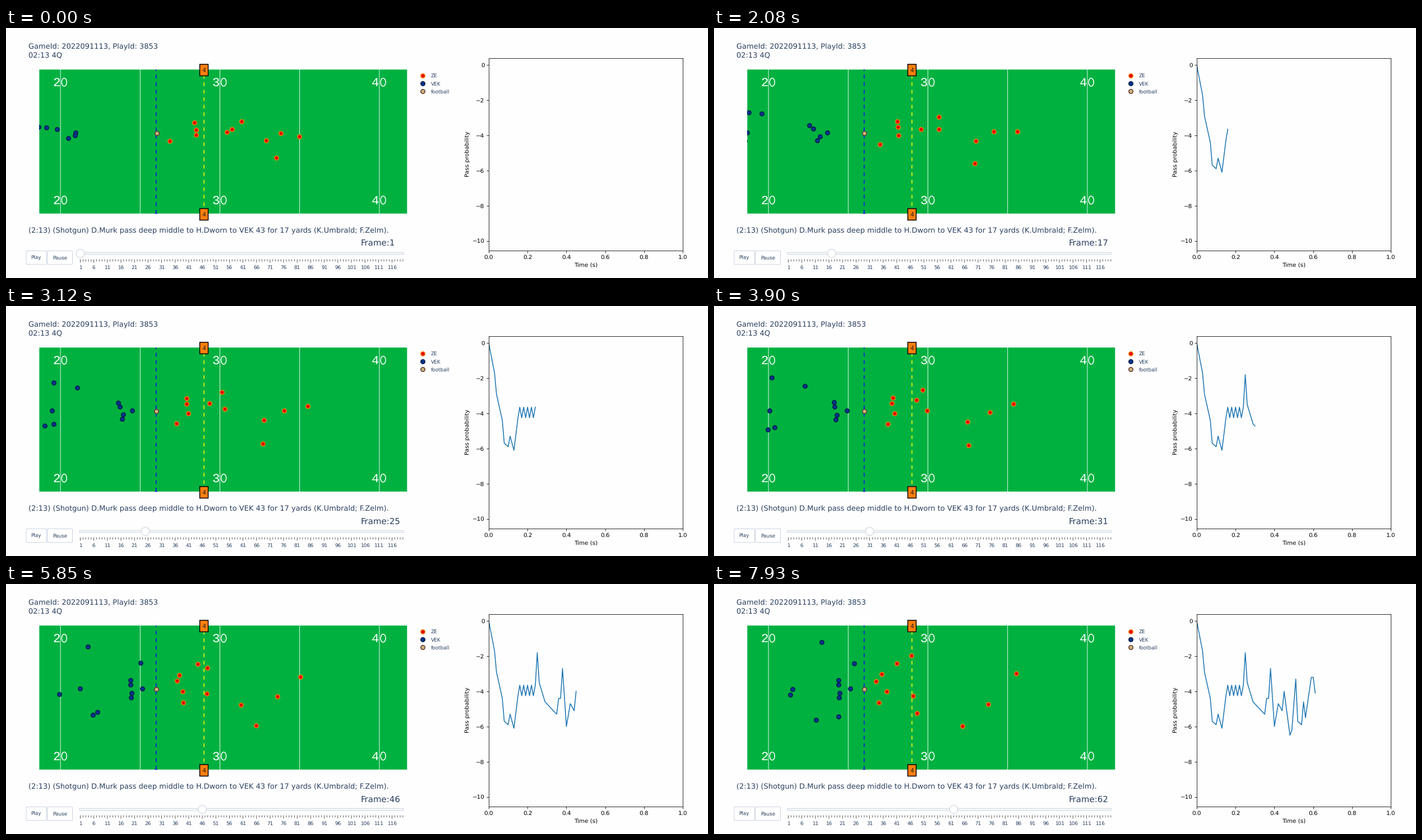
Write a matplotlib script that moves like this. It is 1252 by 447 pixels and loops after 8000 ms.

```python
import numpy as np
import matplotlib.pyplot as plt
from matplotlib.animation import FuncAnimation
from matplotlib.patches import Circle, Ellipse, FancyBboxPatch, Rectangle

W, H, DPI = 1252, 447, 64
STEPS, LOOP = 62, 8000
PT = 72 / DPI          # points per pixel
S = 0.745              # scale of the whole page
PAPER, INK, EDGE = "#fefefe", "#2a3f5f", "#bec8d9"
RED, BLUE, BALL = ("#e00808", "#ff7900"), ("#003594", "#041e42"), ("#cbb67c", "#663831")
MONO = "Liberation Mono"

plt.rcParams.update({"font.family": "DejaVu Sans", "lines.scale_dashes": False,
                     "text.hinting": "no_hinting"})
fig = plt.figure(figsize=(W / DPI, H / DPI), dpi=DPI, facecolor=PAPER)
page = fig.add_axes([0, 0, 1, 1])
page.set(xlim=(0, W), ylim=(H, 0))
page.axis("off")


def write(x, y, text, size, color=INK, ha="left", font="DejaVu Sans", z=5):
    return page.text(x, y, text, fontsize=size * PT, color=color, ha=ha,
                     va="baseline", family=font, zorder=z)


def box(x0, y0, x1, y1, fill, edge="none", lw=0.0, z=1):
    return page.add_patch(Rectangle((x0, y0), x1 - x0, y1 - y0, facecolor=fill,
                                    edgecolor=edge, linewidth=lw * PT, zorder=z))


def upright(x, y0, y1, color, lw, z=2, **style):
    page.plot([x, x], [y0, y1], color=color, lw=lw * PT, zorder=z, **style)


def pill(x0, y0, x1, y1, r, fill):
    page.add_patch(FancyBboxPatch((x0 + r, y0 + r), x1 - x0 - 2 * r, y1 - y0 - 2 * r,
                                  boxstyle=f"round,pad={r}", facecolor=fill,
                                  edgecolor=EDGE, linewidth=0.8 * PT, zorder=3))


def dots(points, colors):
    x, y = np.transpose(points)
    return page.scatter(x, y, s=(10 * S * PT) ** 2, facecolor=colors[0],
                        edgecolor=colors[1], linewidth=1.5 * PT, zorder=6)


def yard(n):
    return 97.1 + 28.44 * (n - 20)


# Field
TOP, BOTTOM = 74.3, 331.8
field = box(59.4, TOP, 715.3, BOTTOM, "#00b140")
for n in range(20, 41, 5):
    upright(yard(n), TOP, BOTTOM, "white", 0.9)
    if n % 10 == 0:
        for base in (104.2, 315):
            write(yard(n), base, f"{n // 10} ", 30 * S, "white", "center", MONO)
            page.add_patch(Ellipse((yard(n) + 6.7, base - 7.3), 9, 14.4, fill=False,
                                   edgecolor="white", lw=1.5 * PT, zorder=5))
for n, color in ((26, "blue"), (29, "yellow")):
    upright(yard(n), BOTTOM, TOP, color, 1.5, 4, ls=(0, (9 * S * PT, 9 * S * PT)))
box(yard(26) - 2.2, 331, yard(26) + 2.2, 332.2, "blue", z=4)
for y in (75.2, 333.2):
    box(yard(29) - 7.5, y - 10.3, yard(29) + 7.5, y + 10.3, "#ff7f0e", "black", 1.5, 7)
    write(yard(29), y + 3.8, "4", 11.5, "#1b1b1b", "center", MONO, 8)

# Texts and legend
write(40, 37.5, "GameId: 2022091113, PlayId: 3853", 13.05)
write(40, 53.5, "02:13 4Q", 13.05)
write(40, 366.5, "(2:13) (Shotgun) D.Murk pass deep middle to H.Dworn to VEK 43 "
      "for 17 yards (K.Umbrald; F.Zelm).", 13)
counter = write(632.3, 389.7, "", 15)
for i, (name, colors) in enumerate((("ZE", RED), ("VEK", BLUE), ("football", BALL))):
    dots([(742.9, 85 + 14.1 * i)], colors)
    write(757.8, 88.5 + 14.1 * i, name, 12 * S)

# Buttons and slider
pill(36, 398.3, 72.3, 422.8, 1.5, "white")
pill(74, 398.3, 118.6, 422.8, 1.5, "white")
write(53.7, 413.5, "Play", 12 * S, ha="center")
write(95.8, 413.5, "Pause", 12 * S, ha="center")
pill(131, 401.2, 709.3, 404.9, 1.5, "#f8fafc")
SLIDE0, SLIDE = 132.5, 4.835
for k in range(120):
    x, major = SLIDE0 + SLIDE * k, k % 5 == 0
    upright(x, 414, 419.2 if major else 417, "#333333", 0.8, 3)
    if major:
        write(x, 431, str(k + 1), 12 * S, ha="center")
grip = page.add_patch(Circle((SLIDE0, 403), 7.4, facecolor="white", edgecolor=EDGE,
                             linewidth=0.8 * PT, zorder=6))
for art in [*page.lines, *page.patches]:
    art.set_snap(False)

# Probability chart
K = S * 100 / DPI
chart = fig.add_axes([860.9 / W, (H - 397.8) / H, 346.4 / W, 344.2 / H], facecolor=PAPER)
chart.set(xlim=(0, 1), ylim=(-10.55, 0.4))
chart.set_xlabel("Time (s)", fontsize=10 * K, labelpad=4 * K)
chart.set_ylabel("Pass probability", fontsize=10 * K, labelpad=4 * K)
chart.set_xticks(np.arange(6) / 5)
chart.set_yticks(range(-10, 1, 2))
chart.tick_params(length=3.5 * K, width=0.8 * K, pad=3.5 * K, labelsize=10 * K)
for spine in chart.spines.values():
    spine.set_linewidth(0.8 * K)
curve, = chart.plot([], [], color="#1f77b4", lw=1.5 * K)

# Turning points of the curve; a steady zigzag fills steps 17 to 24
TURNS = [(0, 0), (3, -1.7), (4, -2.9), (7, -4.4), (8, -5.7), (10, -5.9), (11, -5.3),
         (13, -6.1), (15, -4.3), (25, -1.8), (26, -3.5), (29, -4.6), (35, -5.3),
         (36, -4.4), (37, -4.4), (38, -2.7), (40, -6), (42, -4.7), (44, -5.1),
         (45, -4), (48, -6.5), (49, -6.2), (51, -3.3), (52, -5.7), (54, -5.9),
         (55, -4.6), (56, -5.5), (59, -3.2), (60, -3.2), (61, -4.1)]
steps = np.arange(STEPS)
prob = np.interp(steps, *np.transpose(TURNS))
prob[16:25] = -3.95 + 0.3 * (-1.0) ** steps[16:25]


def run(*points):
    """Polynomial path through points evenly spaced in time."""
    u = np.linspace(0, 1, len(points))
    coef = np.polyfit(u, np.array(points) - 0.6, len(points) - 1)
    return lambda k: np.polyval(coef, k / (STEPS - 1))


def settle(start, end):
    """Walk up to a spot, slowing down over 39 steps."""
    a, b = np.array(start) - 0.6, np.array(end) - 0.6
    return lambda k: b + (a - b) * max(0, 1 - k / 39) ** 2


defence = [
    run((337, 170), (319, 165), (299.5, 162)),
    run((339.5, 182.5), (317.5, 175), (290, 175)),
    run((340, 192), (322, 193), (309, 192.5)),
    run((293, 203), (301, 210), (317, 212), (294.5, 213)),
    run((394.5, 187), (366, 178), (360, 156), (353, 128.5)),
    run((404, 182), (396, 183), (364, 194), (356, 200.5)),
    run((421, 167.5), (393, 157), (350, 145.5), (327, 142.5)),
    run((491, 188.5), (498.5, 186.5), (486, 198), (490, 216)),
    run((524, 195), (540.5, 182.5), (527, 169), (539.5, 161)),
    run((464.5, 201.5), (452, 207.5), (363, 232)),
    run((483, 233), (454, 249.5), (443.5, 255)),
]
offence = [
    settle((73, 179), (222.5, 172.5)),
    settle((92, 182), (223, 180.3)),
    settle((124.5, 187.5), (243.7, 188)),
    settle((123.5, 192.5), (225, 195.3)),
    settle((111.5, 197.5), (224, 203.7)),
    run((59, 178), (107, 149.5), (222, 141.5), (250.5, 142.5)),
    run((15, 188), (105, 128), (193, 105)),
    run((18, 187), (72, 188), (125, 188), (140.5, 188.5)),
    run((-40, 194), (55, 197), (136.5, 199)),
    run((-30, 185), (52, 211), (141, 231), (183, 244)),
    run((-6, 180), (110, 218), (223, 238)),
]
ball = [settle((269.3, 188.7), (268.2, 188.7))]

teams = []
for paths, colors in ((defence, RED), (offence, BLUE), (ball, BALL)):
    marks = dots([path(0) for path in paths], colors)
    marks.set_clip_path(field)
    teams.append((marks, paths))


def draw(k):
    for marks, paths in teams:
        marks.set_offsets([path(k) for path in paths])
    counter.set_text(f"Frame:{k + 1}")
    grip.center = (SLIDE0 + SLIDE * k, 403)
    curve.set_data(steps[:k + 1] / 100, prob[:k + 1])
    return [marks for marks, _ in teams] + [counter, grip, curve]


anim = FuncAnimation(fig, draw, frames=STEPS, interval=LOOP / STEPS,
                     init_func=lambda: draw(0), repeat=True, repeat_delay=0)
plt.show()
```
